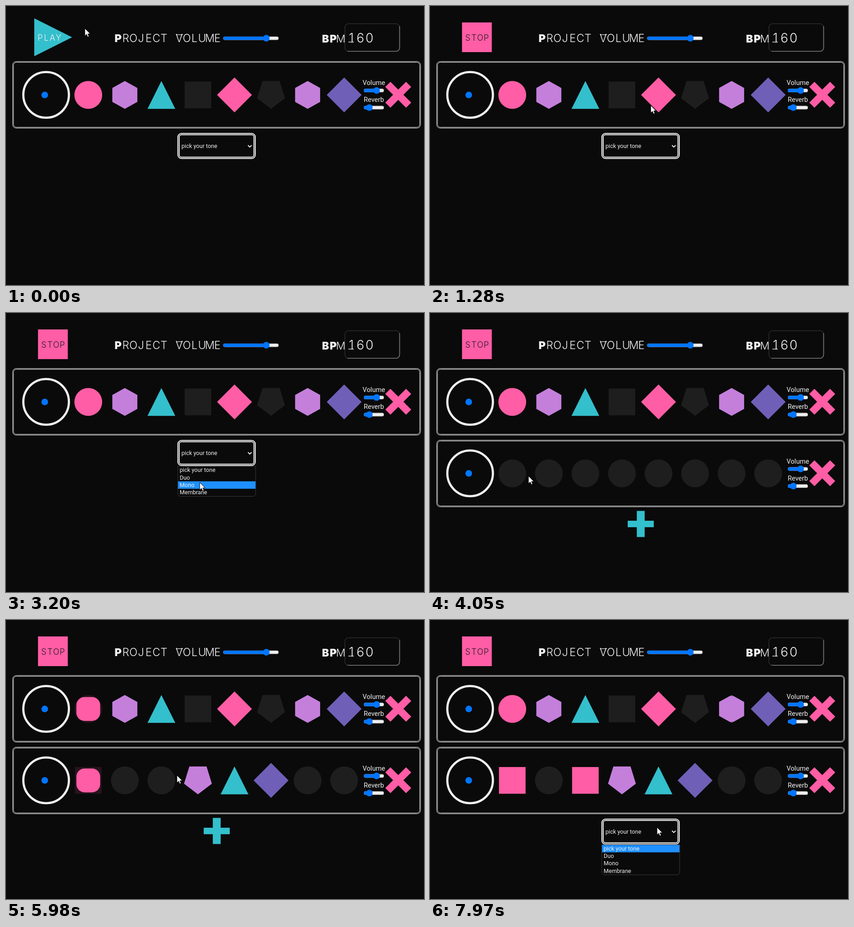
Animation of 917x611 px, one loop 8 s. Source, as an HTML page with a canvas:

```html
<!DOCTYPE html>
<html lang="en">
<head>
<meta charset="utf-8">
<title>Shape sequencer</title>
<style>
html, body { margin: 0; width: 100%; height: 100%; overflow: hidden; background: #0a0a0a; }
canvas { display: block; }
</style>
</head>
<body>
<canvas id="stage" width="917" height="611"></canvas>
<script>
const ctx = document.getElementById('stage').getContext('2d');
const LOOP = 8000, ROW_GAP = 156.5, PULSE = 200, STEPS = 8;
const BG = '#0a0a0a', WHITE = '#f3f1f1', PINK = '#ff5da5', PURPLE = '#c47fdb',
      TEAL = '#34bfcc', INDIGO = '#6f5fb7', GRAY = '#1e1e1e', BLUE = '#0075ff';

// Moments of the story.
const PLAY = 500, OPEN_LIST = 1700, ADD_ROW = 3360, ADD_PICKER = 6970, REOPEN_LIST = 7700;

const SHAPES = {
  circle: () => ctx.arc(0, 0, 30.5, 0, 7),
  triangle: () => ngon(3, 35.2, 40.7, 0, 10.2),
  square: () => ngon(4, 41.3, 41.3, Math.PI / 4),
  diamond: () => ngon(4, 38.3, 38.3),
  pentagon: () => ngon(5, 32.1, 33.7, Math.PI, -3.2),
  hexagon: () => ngon(6, 31.7, 30.5),
};

// Steps of a row: shape, colour, time of the click that sets it.
const IDLE = ['circle', GRAY];
const TOP_ROW = [
  ['circle', PINK], ['hexagon', PURPLE], ['triangle', TEAL], ['square', GRAY],
  ['diamond', PINK], ['pentagon', GRAY], ['hexagon', PURPLE], ['diamond', INDIGO],
];
const NEW_ROW = [
  ['square', PINK, 4440], IDLE, ['square', PINK, 6280], ['pentagon', PURPLE, 5300],
  ['triangle', TEAL, 5470], ['diamond', INDIGO, 5650], IDLE, IDLE,
];

// Each edit restarts the beat.
const RUNS = [
  { start: 1795, step: 0, count: 6, gap: 235 },
  { start: 3480, step: 6, count: 7, gap: 358 },
  { start: 5806, step: 0, count: 7, gap: 358.7 },
];

// Pointer stops: arrival, x, y, rest.
const STOPS = [
  [0, 173, 49, 60], [280, 116, 65, 420], [950, 545, 72, 0], [1520, 447, 307, 280],
  [2060, 443, 347, 190], [2800, 425, 371, 560], [4020, 216, 357, 100], [4360, 180, 349, 140],
  [4950, 411, 346, 340], [5650, 575, 351, 40], [5960, 375, 340, 30], [6180, 342, 347, 180],
  [6820, 459, 448, 330], [7560, 498, 454, 440],
];
const POINTER = STOPS.flatMap(([t, x, y, rest]) => [[t, x, y], [t + rest, x, y]]);
const BUTTON_SCALE = [[130, 1], [280, 1.1], [750, 1.1], [900, 1]];
const BUTTON_COLOR = [[PLAY, 52, 191, 204], [620, 191, 145, 182], [760, 255, 93, 165]];
const LABEL_COLOR = [[PLAY, 243, 241, 241], [620, 174, 137, 168], [760, 40, 24, 34]];

// Eased value between keys of the form [time, ...values].
function track(keys, t) {
  const next = keys.findIndex(k => k[0] > t);
  if (next === 0) return keys[0].slice(1);
  if (next < 0) return keys[keys.length - 1].slice(1);
  const a = keys[next - 1], b = keys[next];
  const u = (t - a[0]) / (b[0] - a[0]), e = u * u * (3 - 2 * u);
  return a.slice(1).map((v, i) => v + (b[i + 1] - v) * e);
}
const rgb = c => `rgb(${c.map(Math.round).join()})`;

function at(x, y, draw) {
  ctx.save();
  ctx.translate(x, y);
  draw();
  ctx.restore();
}
function ngon(n, rx, ry, turn = 0, dy = 0) {
  for (let i = 0; i < n; i++) {
    const a = turn + i * 2 * Math.PI / n;
    ctx.lineTo(rx * Math.sin(a), dy - ry * Math.cos(a));
  }
  ctx.closePath();
}
function path(points) {
  ctx.beginPath();
  for (let i = 0; i < points.length; i += 2) ctx.lineTo(points[i], points[i + 1]);
}
function fill(color) {
  ctx.fillStyle = color;
  ctx.fill();
}
function stroke(width, color) {
  ctx.lineWidth = width;
  ctx.strokeStyle = color;
  ctx.stroke();
}
function disc(x, y, r) {
  ctx.beginPath();
  ctx.arc(x, y, r, 0, 7);
}
function box(x, y, w, h, r) {
  ctx.beginPath();
  ctx.roundRect(x, y, w, h, r);
}
function doubleBorder(x, y, w, h, r, width, gap) {
  for (const d of [0, gap]) {
    box(x + d, y + d, w - 2 * d, h - 2 * d, r - d);
    stroke(width, WHITE);
  }
}
function text(str, x, y, font, color = WHITE, align = 'left') {
  ctx.font = font;
  ctx.fillStyle = color;
  ctx.textAlign = align;
  ctx.fillText(str, x, y);
}
// Thin letters on an even pitch; the first few may be heavy.
function mono(str, x, y, size, pitch, color = WHITE, heavy = 0) {
  [...str].forEach((ch, i) =>
    text(ch, x + i * pitch, y, `${i < heavy ? 900 : 300} ${size}px Inter, sans-serif`, color, 'center'));
}

function slider(x, y, w, thumb, hover) {
  const color = hover ? '#005cc8' : BLUE;
  box(x, y - 3.7, w, 7.4, 3.5);
  fill('#efefef');
  box(x + .5, y - 3.3, w - 1, 6.6, 3);
  stroke(.8, '#b2b2b2');
  box(x, y - 3.7, thumb - x, 7.4, [3.5, 0, 0, 3.5]);
  fill(color);
  disc(thumb, y, 7.3);
  fill(color);
}

function shape(kind, color) {
  ctx.beginPath();
  SHAPES[kind]();
  fill(color);
}

// Squeezes the shape into a small disc through a rounded window.
function step(kind, color, amount) {
  if (!amount || color === GRAY) return shape(kind, color);
  const full = kind === 'diamond' ? 38.5 : 30.5;
  const half = full + (19 - full) * amount;
  ctx.globalAlpha = Math.max(0, 1 - amount * 2.3);
  shape(kind, color);
  ctx.globalAlpha = 1;
  box(-half, -half, 2 * half, 2 * half, half * Math.min(1, 1.8 * amount));
  ctx.clip();
  shape(kind, color);
}

function beatAt(t) {
  const run = RUNS.findLast(r => t >= r.start);
  if (!run) return {};
  const n = Math.floor((t - run.start) / run.gap);
  const phase = (t - run.start - n * run.gap) / PULSE;
  if (n >= run.count || phase > 1) return {};
  return { index: (run.step + n) % STEPS, amount: Math.sin(Math.PI * phase) };
}

function row(dy, steps, t) {
  const beat = beatAt(t);
  doubleBorder(14.5, 121.5 + Math.round(dy), 895, 146, 8, 1, 2);
  at(0, dy, () => {
    disc(88, 194.6, 50);
    stroke(4.8, WHITE);
    disc(85, 194.8, 7.3);
    fill(BLUE);
    steps.forEach(([kind, color, since = 0], i) => {
      const look = t < since ? IDLE : [kind, color];
      at(180.5 + 80.2 * i, 194.8, () => step(...look, beat.index === i ? beat.amount : 0));
    });
    const font = '400 14.6px Roboto, sans-serif';
    text('Volume', 807, 173, font, WHITE, 'center');
    slider(785, 185, 44, 813);
    text('Reverb', 807, 210, font, WHITE, 'center');
    slider(785, 222.5, 44, 797);
    at(860.5, 194.4, () => {
      ctx.rotate(Math.PI / 4);
      cross(64.4, 16, 16, PINK);
    });
  });
}

function cross(size, across, down, color) {
  ctx.fillStyle = color;
  ctx.fillRect(-size / 2, -across / 2, size, across);
  ctx.fillRect(-down / 2, -size / 2, down, size);
}

function picker(dy, open, pointerY) {
  const font = '400 12.6px Roboto, sans-serif', lineHeight = 16.3;
  doubleBorder(377, 279 + Math.round(dy), 170, 55, 8, 2, 3);
  at(0, dy, () => {
    text('pick your tone', 385, 311, font);
    path([530.8, 305, 534.8, 309, 538.8, 305]);
    stroke(1.9, WHITE);
    if (!open) return;
    const picked = Math.max(0, Math.min(3, Math.floor((pointerY - dy - 336) / lineHeight)));
    box(376.9, 335.5, 170.8, 66, [0, 0, 6, 6]);
    fill(BG);
    stroke(1, '#3a3a3a');
    ctx.fillStyle = '#1e90ff';
    ctx.fillRect(377.4, 336 + picked * lineHeight, 170, lineHeight);
    ['pick your tone', 'Duo', 'Mono', 'Membrane'].forEach((name, i) =>
      text(name, 381, 348.3 + i * lineHeight, font));
  });
}

function playButton(t) {
  const [scale] = track(BUTTON_SCALE, t);
  const color = rgb(track(BUTTON_COLOR, t)), label = rgb(track(LABEL_COLOR, t));
  at(103, 68.5, () => {
    ctx.scale(scale, scale);
    if (t < PLAY) {
      path([-41, -41.5, 42, 0, -41, 41.5]);
      fill(color);
      mono('PLAY', -28, 7, 18, 13.4, label);
    } else {
      box(-32.8, -32.6, 65.4, 65.2, 0);
      fill(color);
      mono('STOP', -20, 7, 18, 13.5, label);
    }
  });
}

function header(t, [x, y]) {
  playButton(t);
  mono('PROJECT VOLUME', 246, 78.8, 23.5, 16.75, WHITE, 1);
  path([373, 62.8, 388, 62.8]);
  stroke(1.2, WHITE);
  slider(476.5, 70.6, 121.5, 571, x > 476 && x < 598 && y > 62 && y < 79);

  // Inset border: dark all round, lit along the lower right.
  box(743.5, 38.7, 120, 60.6, 8);
  stroke(1.6, '#2c2c2c');
  ctx.beginPath();
  ctx.moveTo(863.5, 44);
  ctx.arcTo(863.5, 99.3, 855, 99.3, 8);
  ctx.lineTo(749, 99.3);
  stroke(1.6, '#787878');

  mono('BPM', 701, 80, 23, 16.7, WHITE, 2);
  mono('160', 757.5, 79.6, 28, 20);
  path([751, 79, 763, 79]);
  stroke(1.3, WHITE);
}

function cursor(x, y) {
  at(x, y, () => {
    path([0, 0, 0, 16.5, 3.8, 13, 6.3, 18.8, 9, 17.6, 6.6, 12, 11.8, 12]);
    ctx.closePath();
    fill('#fff');
    stroke(1, '#000');
  });
}

function frame() {
  const t = performance.now() % LOOP;
  const pointer = track(POINTER, t);
  ctx.fillStyle = BG;
  ctx.fillRect(0, 0, 917, 611);
  header(t, pointer);
  row(0, TOP_ROW, t);
  if (t < ADD_ROW) {
    picker(0, t > OPEN_LIST, pointer[1]);
  } else {
    row(ROW_GAP, NEW_ROW, t);
    if (t < ADD_PICKER) at(462.3, 462, () => cross(57.2, 14.2, 17.2, TEAL));
    else picker(ROW_GAP, t > REOPEN_LIST, pointer[1]);
  }
  cursor(...pointer);
  requestAnimationFrame(frame);
}
frame();
</script>
</body>
</html>
```
